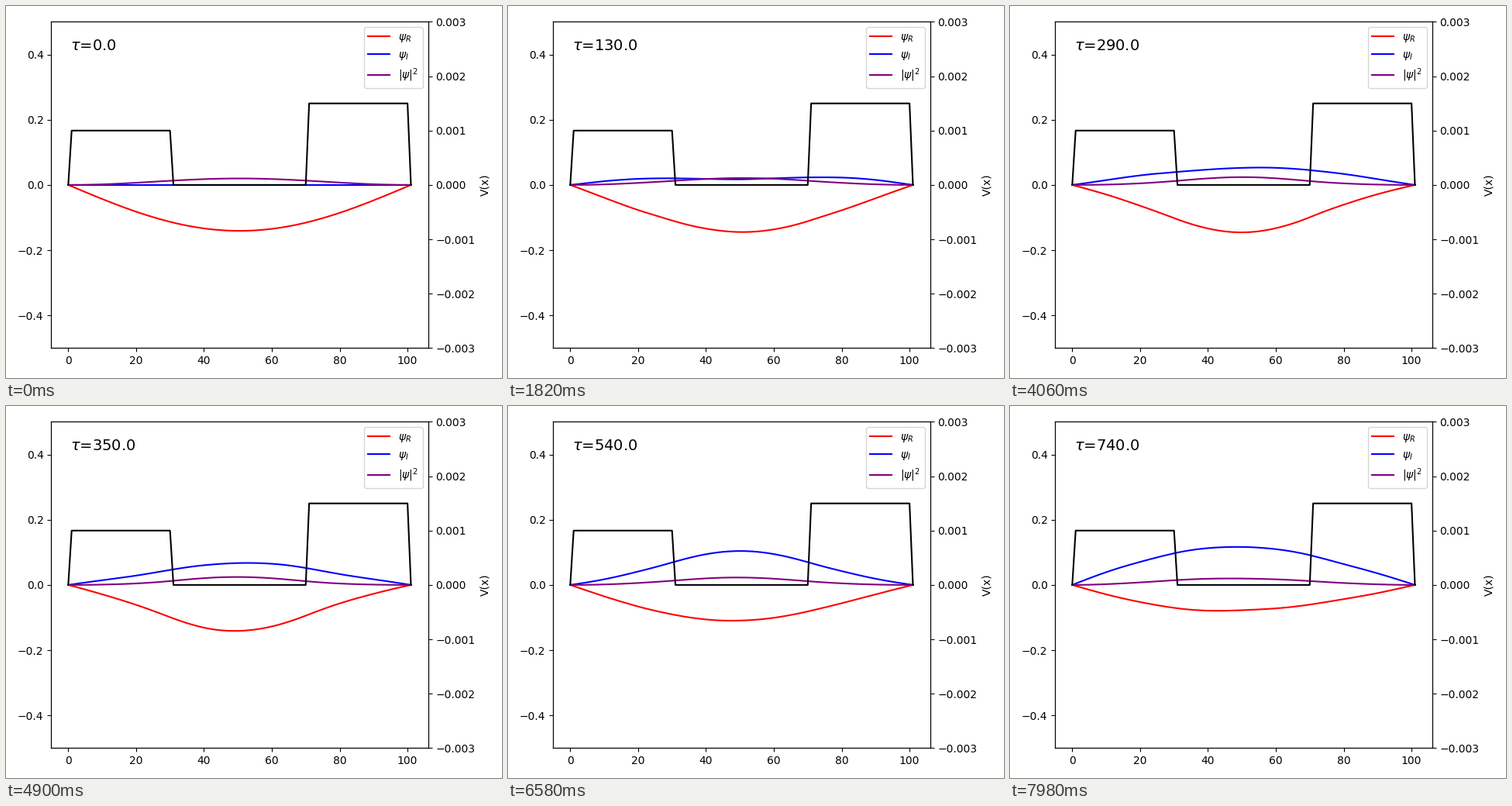
Recreate the animation shown at these times as a matplotlib script. Size 640 px wide and 480 px high, loop 8 s.

```python
import numpy as np
import matplotlib.pyplot as plt
from matplotlib.animation import FuncAnimation

TICK = 20       # ms per frame
HOLD = 140      # ms each state stays on screen
LOOP = 8000     # ms per loop
L = 101         # width of the box

x = np.arange(L + 1)
V = np.zeros(L + 1)
V[1:31] = 0.001
V[71:101] = 0.0015

# H = -d2/dx2 + V on the inner points, solved through its eigenmodes
n = L - 1
H = np.diag(2 + V[1:-1]) - np.eye(n, k=1) - np.eye(n, k=-1)
energy, modes = np.linalg.eigh(H)
psi0 = -np.sqrt(2 / L) * np.sin(np.pi * x / L)
weights = modes.T @ psi0[1:-1]


def psi_at(tau):
    psi = np.zeros(L + 1, complex)
    psi[1:-1] = modes @ (weights * np.exp(-1j * energy * tau))
    return psi


def tau_at(step):
    """Steps of 10 up to 400, then steps of 20."""
    return 10.0 * (step + max(0, step - 40))


fig, ax = plt.subplots(figsize=(6.4, 4.8), dpi=100)
real, = ax.plot(x, psi0, color="red", label=r"$\psi_R$")
imag, = ax.plot(x, 0 * psi0, color="blue", label=r"$\psi_I$")
dens, = ax.plot(x, psi0**2, color="purple", label=r"$|\psi|^2$")
ax.set_ylim(-0.5, 0.5)
ax.legend(loc="upper right")
clock = ax.text(0.05, 0.95, "", transform=ax.transAxes, fontsize=14, va="top")

ax_v = ax.twinx()
ax_v.plot(x, V, color="black")
ax_v.set_ylim(-0.003, 0.003)
ax_v.set_ylabel("V(x)")
fig.tight_layout()


def update(frame):
    tau = tau_at(frame * TICK // HOLD)
    psi = psi_at(tau)
    real.set_ydata(psi.real)
    imag.set_ydata(psi.imag)
    dens.set_ydata(np.abs(psi) ** 2)
    clock.set_text(rf"$\tau$={tau:.1f}")
    return real, imag, dens, clock


anim = FuncAnimation(fig, update, frames=LOOP // TICK, interval=TICK,
                     repeat=True, repeat_delay=0)
plt.show()
```
